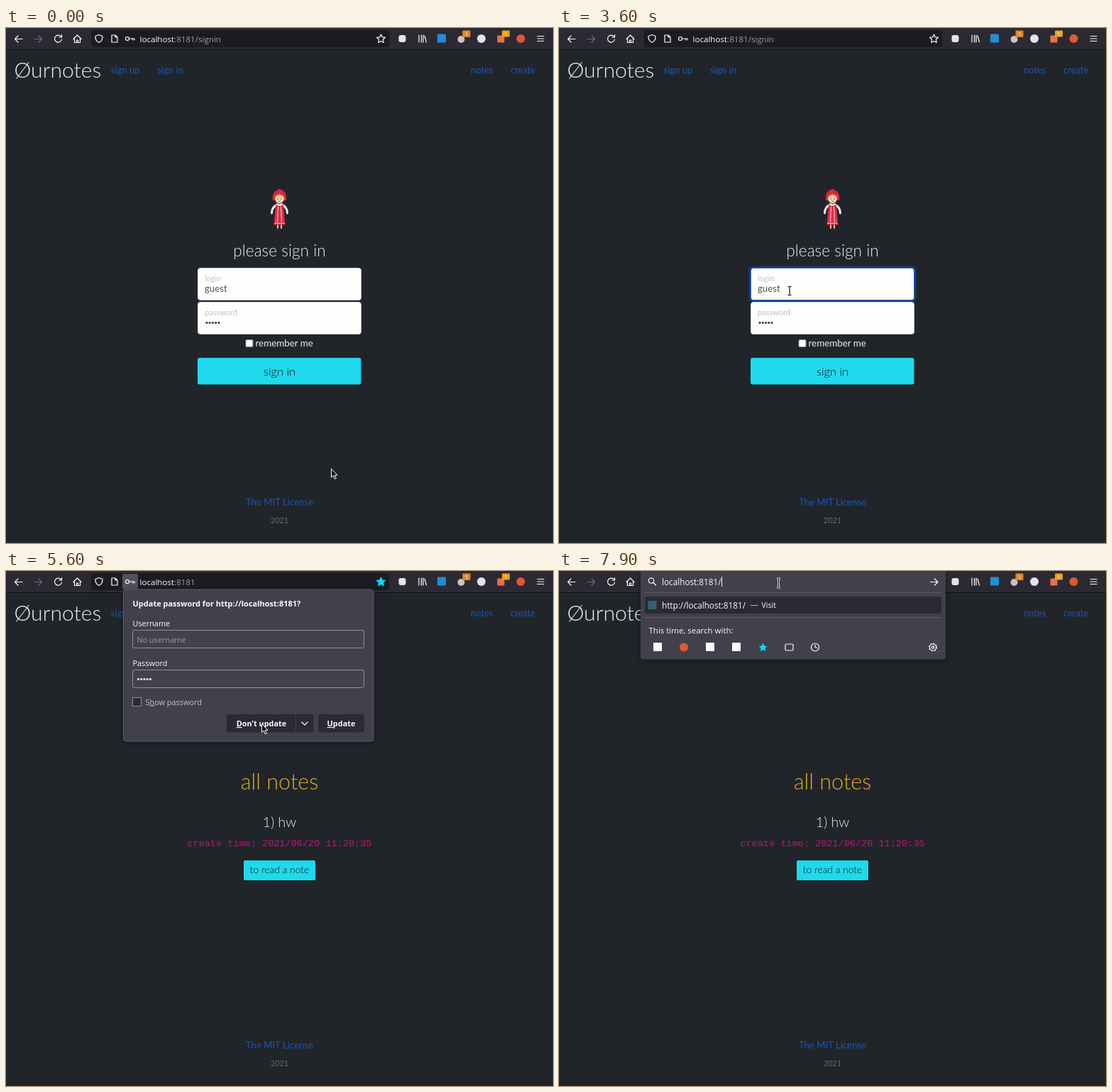
An HTML page that plays this animation: 771x726 px, repeating every 8000 ms.

```html
<!DOCTYPE html>
<html lang="en">
<head>
<meta charset="utf-8">
<title>sign in</title>
<style>
  html, body { margin: 0; width: 100%; height: 100%; overflow: hidden; background: #212529; }
  svg { display: block; width: 771px; height: 726px; }
  text { white-space: pre; }
  .ui { font-family: "Open Sans", "Noto Sans", sans-serif; font-size: 10.9px; fill: #fbfbfe; }
  .page { font-family: Lato, sans-serif; font-size: 13.2px; fill: #eeeff0; }
  .thin { font-weight: 300; }
  .mid { text-anchor: middle; }
  .link { fill: #1a57b3; }
  .dim { fill: #9c9ca8; }
  .bold { font-weight: 700; }
  .key { text-decoration: underline; }
  .line { fill: none; stroke: #fbfbfe; stroke-width: 1.2; stroke-linecap: round; stroke-linejoin: round; }
  .dots { stroke-width: 3.2; stroke-linecap: round; stroke-dasharray: 0 4.25; }
</style>
</head>
<body>
<svg viewBox="0 0 771 726">
  <defs>
    <path id="starShape" d="M0-6 1.8-2.1 6-1.6 2.9 1.3 3.7 5.5 0 3.4-3.7 5.5-2.9 1.3-6-1.6-1.8-2.1Z"/>
    <filter id="soft" x="-10%" y="-10%" width="120%" height="130%">
      <feDropShadow dx="0" dy="2" stdDeviation="4" flood-opacity=".4"/>
    </filter>
  </defs>
  <rect width="771" height="726" fill="#212529"/>

  <!-- page -->
  <g class="page">
    <text class="thin" x="11.5" y="70" font-size="30.2">Øurnotes</text>
    <g class="link">
      <text x="147.5" y="63.5">sign up</text>
      <text x="213" y="63.5">sign in</text>
      <text x="655" y="63.5" font-size="12.9">notes</text>
      <text x="711" y="63.5" font-size="12.9">create</text>
      <text class="mid" x="385.5" y="672.5">The MIT License</text>
    </g>
    <text class="mid" x="385.5" y="697.5" font-size="10.8" fill="#646c74">2021</text>
  </g>

  <g id="signin" class="page">
    <g id="doll" fill="none" stroke-linecap="round">
      <path d="M380 250Q374.500 254 374.500 261M391 250Q396.500 254 396.500 261" stroke="#f1e9e4" stroke-width="3"/>
      <path d="M383 277V282M388 277V282" stroke="#f0b9a0" stroke-width="2"/>
      <path d="M380.5 247H390.5L393.5 277.5H377.5Z" fill="#dc2f4b"/>
      <path d="M383.5 252 382.5 274M387.5 252 388.5 274M379 275.5H392" stroke="#f3c9c8"/>
      <path d="M376 243Q374.5 230 385.5 227Q396.5 230 395 243Z" fill="#d92744"/>
      <circle cx="385.5" cy="241" r="6.2" fill="#f6d3ae"/>
      <path d="M379.500 239Q385.500 231.500 391.500 239" stroke="#e9b84c" stroke-width="1.6"/>
      <path d="M383 241H383.500M387.500 241H388" stroke="#463034"/>
      <path d="M384.500 244.500H386.500" stroke="#d5455a"/>
      <path d="M382 248.500 385.5 250 389 248.500" stroke="#fff" stroke-width="2"/>
    </g>
    <text class="thin mid" x="385.5" y="322" font-size="22.7">please sign in</text>
    <rect id="glow" x="267.5" y="336" width="236" height="50" rx="5" fill="#133c78"/>
    <rect id="login" x="270.5" y="338.5" width="230" height="45" rx="3.5" fill="#fffefd"/>
    <rect x="270.5" y="386.5" width="230" height="45" rx="3.5" fill="#fffefd" stroke="#ced4da"/>
    <g font-size="11" fill="#c2c3ca">
      <text x="280" y="357">login</text>
      <text x="280" y="404.5">password</text>
    </g>
    <text x="280" y="372" fill="#4c5157">guest</text>
    <path class="dots" d="M283 415.5h18" stroke="#34383d"/>
    <rect x="338" y="439.5" width="10" height="10" rx="1.5" fill="#fff" stroke="#8f8f9d"/>
    <text x="351.5" y="448.5" font-size="13.4">remember me</text>
    <rect id="ring" x="267.5" y="462.5" width="236" height="43" rx="5" fill="#1b7680"/>
    <rect id="submit" x="270" y="465" width="230.5" height="37.5" rx="3"/>
    <text class="thin mid" x="385.5" y="489.5" font-size="16.4" fill="#101418">sign in</text>
  </g>

  <g id="notes" class="page mid">
    <text class="thin" x="385.5" y="308" font-size="30.6" fill="#dfab2a">all notes</text>
    <text class="thin" x="385.5" y="360.5" font-size="19.6">1) hw</text>
    <text x="385.5" y="388" fill="#bd1579" style="font:13.54px 'Liberation Mono',monospace">create time: 2021/06/20 11:20:35</text>
    <rect x="335" y="408" width="101" height="28" rx="2" fill="#1edaec"/>
    <text class="thin" x="385.5" y="426" font-size="13.8" fill="#101418">to read a note</text>
  </g>

  <!-- toolbar -->
  <rect width="771" height="30" fill="#2b2a33"/>
  <rect y="30" width="771" height="1" fill="#0e0e12"/>
  <rect id="urlbar" x="120" y="3" width="420" height="24" rx="3.5" stroke-width="1.5"/>
  <rect id="keyBack" x="164" y="4" width="22" height="22" rx="2" fill="#52525e"/>
  <g class="line">
    <path d="M23 15.5H13M17 11 12.5 15.5 17 20"/>
    <path d="M40 15.5H50M46 11 50.5 15.5 46 20" stroke="#6f6e79"/>
    <path id="reload" d="M77.5 12A5 5 0 1 0 78.5 16M78.5 9.5V13H75"/>
    <path id="stop" d="M69 11 77.5 19.5M77.5 11 69 19.5"/>
    <path d="M95 15.5 100.5 10 106 15.5M96.5 14.5V20.5H104.5V14.5M99.5 20.5V17H101.5V20.5"/>
    <path d="M131 9.5 136 11.5Q136.5 18 131 20.5Q125.5 18 126 11.5Z"/>
    <path d="M149 10H154L157 13V20H149ZM154 10V13H157"/>
    <path d="M174.5 15H181V17M178.5 15V17"/><circle cx="171" cy="15" r="2.5"/>
    <use id="star" href="#starShape" x="528.5" y="15"/>
    <path d="M582 10V20M585.5 10V20M588 10V20M590 11 592.5 20"/>
    <path d="M749 11.5H758M749 15H758M749 18.5H758"/>
  </g>
  <rect id="select" x="188" y="8" width="79" height="15" fill="#167f9a"/>
  <text class="ui" x="188.5" y="19.5" style="font-size:11.6px">localhost<tspan id="port">:8181</tspan><tspan id="route" class="dim">/signin</tspan></text>
  <rect id="caret" x="267" y="8" width="1" height="14" fill="#fbfbfe"/>
  <rect x="553.5" y="10" width="10" height="10" rx="3" fill="#e4e4e8"/>
  <rect x="608" y="8.5" width="12" height="12" rx="1" fill="#1f8fd6"/>
  <circle cx="641.5" cy="16" r="5" fill="#c9c4bd"/>
  <circle cx="670" cy="15" r="6" fill="#dbe4f0"/>
  <rect x="692.5" y="10.5" width="10" height="10" rx="1" fill="#e8714a"/>
  <circle cx="725.5" cy="15" r="6" fill="#de5833"/>
  <g class="ui mid" style="font-size:8px">
    <rect x="643.5" y="3.5" width="11" height="9.5" rx="1" fill="#e3862b"/><text x="649" y="11">1</text>
    <g id="badge"><rect x="699" y="3.5" width="11" height="9" rx="1" fill="#f09d1b"/><text x="704.5" y="11">1</text></g>
  </g>

  <!-- password prompt -->
  <g id="prompt" class="ui">
    <rect x="165.5" y="26" width="352.5" height="214" rx="4" fill="#42414d" stroke="#5b5b66" filter="url(#soft)"/>
    <text class="bold" x="178.5" y="49.5" style="font-size:11px">Update password for http://localhost:8181?</text>
    <text x="178.5" y="78">Username</text>
    <text x="178.5" y="133.5">Password</text>
    <g fill="#42414d" stroke="#8f8f9d">
      <rect x="178.5" y="83.5" width="326" height="25" rx="2.5"/>
      <rect x="178.5" y="139.5" width="326" height="25" rx="2.5"/>
      <rect x="178.5" y="178.5" width="12" height="12" fill="#2b2a33"/>
    </g>
    <text class="dim" x="184.5" y="100.5">No username</text>
    <path class="dots" d="M186.5 152.5h18" stroke="#fbfbfe"/>
    <text x="196.5" y="188.5" fill="#c4c4cd">S<tspan class="key">h</tspan>ow password</text>
    <rect x="311" y="202" width="122.5" height="25.5" rx="3" fill="#2b2a33"/>
    <rect x="440" y="202" width="65" height="25.5" rx="3" fill="#2b2a33"/>
    <path d="M408.5 202V227.5" stroke="#42414d"/>
    <path class="line" d="M417 213 421 217 425 213"/>
    <g class="bold mid">
      <text x="360" y="219"><tspan class="key">D</tspan>on’t update</text>
      <text x="472.5" y="219"><tspan class="key">U</tspan>pdate</text>
    </g>
  </g>

  <g id="status" class="ui">
    <path d="M-1 710.5H245Q248.5 710.5 248.5 714V727H-1Z" fill="#2b2a33" stroke="#5b5b66"/>
    <text x="2" y="723" style="font-size:11.2px">Waiting for cdn.jsdelivr.net…</text>
  </g>

  <!-- address suggestions -->
  <g id="suggest" class="ui">
    <path d="M115 0H545V121Q545 124.5 541.5 124.5H118.5Q115 124.5 115 121Z" fill="#42414d" filter="url(#soft)"/>
    <path d="M121 30.5H539M121 65.5H539" stroke="#5b5b66"/>
    <rect x="121" y="36" width="418" height="24" rx="3" fill="#2b2a33"/>
    <rect x="125.5" y="42" width="12" height="12" fill="#35607c"/>
    <g style="font-size:11.75px">
      <text x="145" y="19.5">localhost:8181/</text>
      <text x="145" y="52.5">http://localhost:8181/</text>
      <text x="126.5" y="88" style="font-size:11.5px">This time, search with:</text>
    </g>
    <path d="M269.5 48.5H280.5" stroke="#b5b5be"/>
    <text x="285.5" y="52" style="font-size:10.6px">Visit</text>
    <rect x="229" y="8" width="1" height="14" fill="#fbfbfe"/>
    <rect x="133" y="101" width="12" height="12" rx="1" fill="#fff"/>
    <circle cx="176" cy="107.5" r="6" fill="#de5833"/>
    <rect x="207" y="101" width="12" height="12" rx="1" fill="#fff"/>
    <rect x="244" y="101" width="12" height="12" rx="1" fill="#fff"/>
    <use href="#starShape" x="287.5" y="107.5" fill="#00ddff"/>
    <g class="line">
      <circle cx="130" cy="13.5" r="3.7"/><path d="M133 16.5 136.5 20"/>
      <path d="M523.5 15.5H533.5M529.5 11 534 15.5 529.5 20"/>
      <rect x="319" y="103" width="11" height="9" rx="1.5"/>
      <circle cx="361" cy="107.5" r="5.5"/><path d="M361 104V107.5L363.5 108.5"/>
      <circle cx="527" cy="107.5" r="4.5"/><circle cx="527" cy="107.5" r="1.6"/>
      <circle cx="527" cy="107.5" r="5.5" stroke-dasharray="2 2.32" stroke-linecap="butt"/>
    </g>
  </g>

  <!-- pointers, hot spot at 0,0 -->
  <g id="pointer" stroke-linejoin="round">
    <path id="arrow" d="M.5.5V12.5L3.3 10 5.4 14.7 7.4 13.8 5.3 9.3H9Z" fill="#111" stroke="#fff"/>
    <g id="beam" fill="none">
      <path d="M-2.5-6H2.5M0-6V6M-2.5 6H2.5" stroke="#fff" stroke-width="2.8"/>
      <path d="M-2.5-6H2.5M0-6V6M-2.5 6H2.5" stroke="#111" stroke-width="1.2"/>
    </g>
    <path id="hand" d="M-1.5.5Q-.5-1 .7.5V5L6 6Q7.5 6.5 7 9L5.5 13.5H-.5L-4.5 8.5Q-4.5 6.5-2.5 7.5L-1.5 8.5Z" fill="#fff" stroke="#15181c"/>
  </g>
</svg>
<script>
const $ = id => document.getElementById(id);
const set = (id, attrs) => { for (const k in attrs) $(id).setAttribute(k, attrs[k]); };
const show = (id, on) => set(id, { display: on ? "inline" : "none" });

const LOOP = 8000, STEP = 100;
// time, x, y of the pointer
const PATH = [
  [0, 458, 621], [700, 458, 621], [900, 406.5, 408], [1000, 406.5, 408],
  [1300, 272, 15], [1500, 290, 16], [1800, 318, 425], [1900, 316.5, 398],
  [2000, 316.5, 398], [2200, 322.5, 369.5], [2400, 322.5, 369.5], [2600, 246, 359],
  [3000, 246, 359], [3400, 496, 372], [3600, 325, 370.5], [3900, 366, 434],
  [4100, 380, 482], [4600, 380, 482], [4700, 375, 494], [5200, 375, 494],
  [5600, 360, 215], [5700, 360, 215], [5900, 340, 150], [6000, 340, 150],
  [6300, 314.5, 20.5], [6700, 314.5, 20.5], [6900, 309.5, 17], [LOOP, 309.5, 17]
];

function pointerAt(t) {
  const i = PATH.findIndex(p => p[0] > t);
  const [t0, x0, y0] = PATH[i - 1], [t1, x1, y1] = PATH[i];
  const k = (t - t0) / (t1 - t0);
  return [x0 + (x1 - x0) * k, y0 + (y1 - y0) * k];
}

function draw(t) {
  const within = (a, b) => t >= a && t < b;
  const [x, y] = pointerAt(t);
  const inside = (l, top, r, bottom) => x >= l && x <= r && y >= top && y <= bottom;
  const signin = t < 5100, moved = t >= 4800, edit = t >= 6500;

  show("signin", signin);
  show("notes", !signin);
  const glow = t < 2500 ? 0 : t < 2600 ? 0.5 : t < 4400 ? 1 : t < 4500 ? 0.4 : 0;
  set("glow", { opacity: glow });
  set("login", { stroke: within(2500, 4600) ? "#2a68c8" : "#ced4da" });
  show("ring", t >= 4600);
  set("submit", { fill: t < 4000 ? "#1edaec" : t < 4100 ? "#30ddec" : "#41e0ed" });

  const loading = within(4700, 5300);
  show("stop", loading);
  show("reload", !loading);
  show("route", !moved);
  set("star", moved ? { fill: "#00ddff", stroke: "#00ddff" } : { fill: "none", stroke: "#fbfbfe" });
  show("badge", !within(4800, 5100));
  show("keyBack", within(4900, 5700));
  show("prompt", within(4900, 5700));
  show("status", within(4800, 5100));

  set("urlbar", { fill: edit ? "#42414d" : "#1c1b22", stroke: edit ? "#00ddff" : "none" });
  set("port", { fill: edit ? "#fbfbfe" : "#9c9ca8" });
  show("select", within(6500, 6800));
  show("caret", within(6900, 7600));
  show("suggest", t >= 7800);

  const beam = inside(119, 3, 540, 28) || signin && inside(270, 338, 500, 431);
  const hand = signin ? t < 4700 && inside(270, 465, 500, 502) : inside(335, 408, 436, 436);
  show("beam", beam);
  show("hand", hand);
  show("arrow", !beam && !hand);
  set("pointer", { transform: `translate(${x} ${y})` });
}

const start = performance.now();
function tick() {
  const t = (performance.now() - start) % LOOP;
  draw(Math.floor(t / STEP) * STEP);
  requestAnimationFrame(tick);
}
tick();
</script>
</body>
</html>
```
